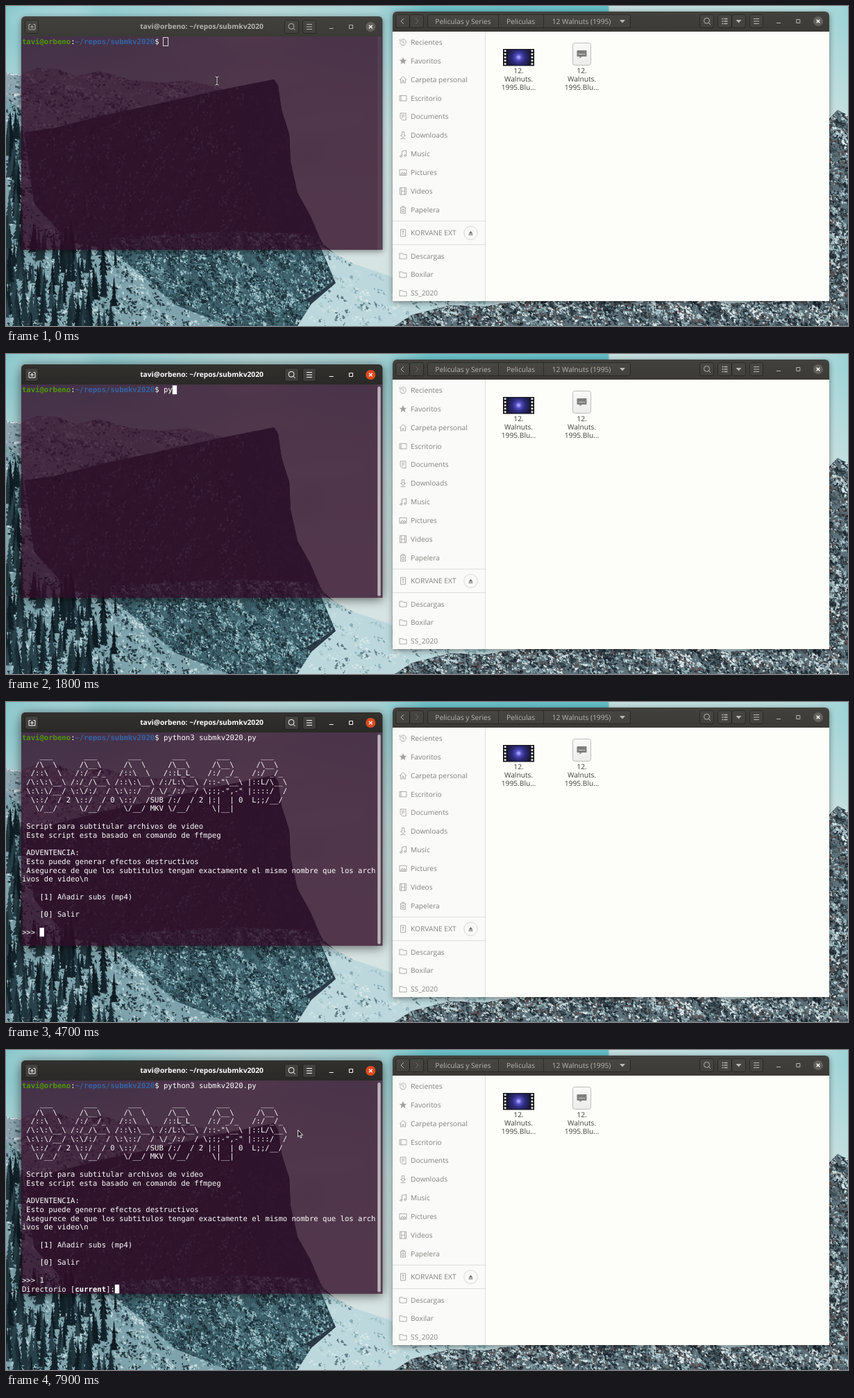
An HTML page with a canvas for the animation above (8000 ms loop, 1213 by 462 pixels).

```html
<!DOCTYPE html>
<html lang="es">
<head>
<meta charset="utf-8">
<title>submkv2020</title>
<style>
  html, body { margin: 0; width: 100%; height: 100%; overflow: hidden; background: #9cc5cc; }
  canvas { display: block; }
</style>
</head>
<body>
<canvas id="stage" width="1213" height="462"></canvas>
<script>
const W = 1213, H = 462, LOOP = 8000;
const UI = '"Open Sans", "Noto Sans", sans-serif';
const MONO = '"DejaVu Sans Mono", monospace';
const COL = 6.375, ROW = 12.75, LEFT = 23, TOP = 45.4;
const USER = 'tavi@orbeno', FOLDER = '~/repos/submkv2020', PROMPT_COLS = 32;

const screen = document.getElementById('stage').getContext('2d');
const backdrop = Object.assign(document.createElement('canvas'), { width: W, height: H });
let ctx = backdrop.getContext('2d');
for (const c of [screen, ctx]) c.textRendering = 'geometricPrecision';

// ---------- drawing helpers ----------
let seed = 2020;
function random(min = 0, max = 1) {
  seed = (seed + 0x6D2B79F5) | 0;
  let n = Math.imul(seed ^ (seed >>> 15), 1 | seed);
  n = (n + Math.imul(n ^ (n >>> 7), 61 | n)) ^ n;
  return min + (max - min) * ((n ^ (n >>> 14)) >>> 0) / 2 ** 32;
}
const pick = list => list[Math.floor(random(0, list.length))];

function shape(points) {
  const path = new Path2D();
  for (let i = 0; i < points.length; i += 2) path.lineTo(points[i], points[i + 1]);
  path.closePath();
  return path;
}
function fill(path, color) { ctx.fillStyle = color; ctx.fill(path); }
function rect(x, y, w, h, color) { ctx.fillStyle = color; ctx.fillRect(x, y, w, h); }
function rounded(x, y, w, h, r) {
  const path = new Path2D();
  path.roundRect(x, y, w, h, r);
  return path;
}
function gradient(x0, y0, x1, y1, ...stops) {
  const g = ctx.createLinearGradient(x0, y0, x1, y1);
  stops.forEach(([at, color]) => g.addColorStop(at, color));
  return g;
}
function disc(x, y, r, color) {
  ctx.beginPath();
  ctx.arc(x, y, r, 0, 7);
  ctx.fillStyle = color;
  ctx.fill();
}
function icon(x, y, d, color, { width = 1, solid = false } = {}) {
  ctx.save();
  ctx.translate(x, y);
  ctx.lineWidth = width;
  ctx.strokeStyle = ctx.fillStyle = color;
  ctx[solid ? 'fill' : 'stroke'](new Path2D(d));
  ctx.restore();
}
function label(text, x, y, color, { size = 10.2, weight = 400, align = 'left' } = {}) {
  ctx.font = `${weight} ${size}px ${UI}`;
  ctx.textAlign = align;
  ctx.fillStyle = color;
  ctx.fillText(text, x, y + 3.6);
}
function shadow(path, blur, alpha) {
  const outside = new Path2D();
  outside.rect(0, 0, W, H);
  outside.addPath(path);
  ctx.save();
  ctx.clip(outside, 'evenodd');
  ctx.shadowColor = `rgba(0,0,0,${alpha})`;
  ctx.shadowBlur = blur;
  ctx.shadowOffsetY = 2;
  fill(path, '#000');
  ctx.restore();
}

// ---------- wallpaper ----------
// Fills an outline and scatters clusters of angular flakes over it.
function mountain(points, color, clusters, flakes, slope, spread = 9) {
  const xs = points.filter((_, i) => i % 2 === 0), ys = points.filter((_, i) => i % 2);
  const [left, right, top, bottom] = [Math.min(...xs), Math.max(...xs), Math.min(...ys), Math.max(...ys)];
  const outline = shape(points);
  fill(outline, color);
  ctx.save();
  ctx.clip(outline);
  for (let i = 0; i < clusters; i++) {
    const cx = random(left, right), cy = random(top, bottom);
    const tint = pick(flakes);
    for (let j = 0; j < 6; j++) {
      const along = random(-spread, spread), across = random(-3, 3);
      const x = cx + Math.cos(slope) * along - Math.sin(slope) * across;
      const y = cy + Math.sin(slope) * along + Math.cos(slope) * across;
      const size = random(2, 6.5), angle = slope + random(-1, 1);
      const dx = Math.cos(angle) * size, dy = Math.sin(angle) * size, k = random(.2, .6);
      fill(shape([x, y, x + dx * k - dy * k, y + dy * k + dx * k, x + dx, y + dy, x + dx * .4, y + dy * .4 - 1]), tint);
    }
  }
  ctx.restore();
}
function tree(x, base, height) {
  const points = [x, base - height];
  for (const side of [1, -1]) {
    for (let i = 1; i <= 7; i++) {
      const k = side > 0 ? i / 7 : (8 - i) / 7;
      const reach = height * random(.09, .2) * k * side, y = base - height * (1 - k);
      if (side > 0) points.push(x + reach, y, x + reach * .5, y - 1);
      else points.push(x + reach * .5, y - 1, x + reach, y);
    }
  }
  fill(shape(points), pick(['#13222a', '#1a2b33', '#20343b', '#0f1b22', '#29414a']));
}
function forest(count, place) {
  const trees = Array.from({ length: count }, place).sort((a, b) => a[1] - b[1]);
  trees.forEach(([x, base]) => tree(x, base, random(24, 52)));
}
function wallpaper() {
  rect(0, 0, W, H, gradient(0, 0, W, 0, [0, '#86c6cb'], [.12, '#93cdd0'], [.3, '#b5d6d7'],
    [.44, '#a9d3d5'], [.5, '#6cc1c8'], [.715, '#62bec6'], [.717, '#c5dfdf'], [.96, '#b5dcdd'], [1, '#9dd3d6']));
  rect(0, 0, W, H, gradient(0, 20, 0, 330, [0, 'rgba(218,229,228,0)'], [.5, 'rgba(218,229,228,.7)'], [1, 'rgba(218,229,228,.92)']));
  ctx.filter = 'blur(10px)';
  ctx.globalAlpha = .22;
  for (let i = 0; i < 16; i++) {
    ctx.beginPath();
    ctx.ellipse(random(60, 540), random(0, 260), random(25, 70), random(5, 18), -.1, 0, 7);
    ctx.fillStyle = pick(['#fff', '#8fb5bb']);
    ctx.fill();
  }
  ctx.filter = 'none';
  ctx.globalAlpha = 1;

  mountain([0, 96, 22, 99, 45, 89, 75, 91, 100, 101, 135, 94, 180, 107, 225, 111, 262, 107, 310, 119, 380, 180, 380, 300, 0, 300],
    '#8ea6b0', 1300, ['#d3e1e5', '#a9bfc7', '#3f525e', '#62798a', '#7d949f'], .3, 14);
  mountain([0, 186, 70, 176, 140, 158, 215, 142, 300, 123, 355, 112, 386, 106, 392, 115, 397, 150, 408, 185, 410, 225,
    420, 270, 438, 302, 455, 342, 490, 372, 520, 390, 600, 462, 0, 462],
    '#2c3b48', 3200, ['#3a4d59', '#1a2530', '#222f3b', '#6a808b', '#2b3b47', '#4a5f6b'], 2.2, 12);
  // smoother cliff face turned away from the snow
  mountain([386, 106, 392, 115, 397, 150, 408, 185, 410, 225, 420, 270, 438, 302, 455, 342, 380, 320, 350, 250, 335, 180, 345, 115],
    '#2c3a4a', 300, ['#33424f', '#273441', '#3a4957'], 1.4, 14);
  // rock and snow at the foot of the cliff
  mountain([150, 335, 330, 325, 448, 330, 474, 368, 470, 400, 430, 425, 520, 462, 150, 462],
    '#3f626c', 2100, ['#22343d', '#2c4650', '#48707a', '#74a0a9', '#a3c6cc', '#1a2b34', '#3a5a65'], .9);
  mountain([452, 345, 500, 372, 560, 392, 640, 418, 720, 430, 1213, 424, 1213, 462, 420, 462, 440, 430, 475, 400],
    '#bcd8dc', 600, ['#d9e8ea', '#a1c4ca', '#5d7c86', '#87adb5', '#c9dfe2'], .6);
  mountain([0, 130, 22, 150, 40, 285, 90, 340, 150, 352, 200, 392, 240, 430, 320, 462, 0, 462],
    '#7fa3ac', 1300, ['#c6dce0', '#22353e', '#5b7f89', '#16262e', '#a9c9cf', '#31474f'], .7);
  mountain([560, 462, 585, 446, 640, 432, 690, 434, 745, 425, 840, 418, 920, 422, 985, 418, 1040, 430, 1100, 424, 1130, 410,
    1162, 310, 1184, 165, 1198, 150, 1213, 158, 1213, 462],
    '#5d717a', 7000, ['#dfe9ea', '#b9d0d4', '#5f5150', '#242e36', '#3c4b54', '#1d272f', '#93b0b7', '#2c363d'], .75);
  forest(120, () => [160 * random() ** 1.5, random(350, 490)]);
  forest(45, () => [random(0, 26), random(190, 400)]);
}

// ---------- shared window parts ----------
function headerButton(x, y, w, h = 20, lift = .03) {
  const box = rounded(x + .5, y + .5, w - 1, h - 1, 3);
  fill(box, `rgba(255,255,255,${lift})`);
  ctx.lineWidth = 1;
  ctx.strokeStyle = 'rgba(0,0,0,.38)';
  ctx.stroke(box);
}
const SEARCH = 'M3.5-.7A4 4 0 1 1-4.5-.7 4 4 0 1 1 3.5-.7M2.3 2.2 5 5';
const MENU = 'M-4-3.5H4M-4 0H4M-4 3.5H4';
const CROSS = 'M-2.3-2.3 2.3 2.3M2.3-2.3-2.3 2.3';
const ARROW_DOWN = 'M-4-2H4L0 2.5z';
function windowControls(x, y, color) {
  icon(x, y, 'M-3 2.5H3', color);
  icon(x + 28.3, y, 'M-2.5-2.5H2.5V2.5H-2.5z', color);
}

// ---------- file manager ----------
const PLACES = [
  ['Recientes', 'M1 5.5a4.5 4.5 0 1 0 1.8-3.6M1 .8v3h3M5.5 3v3l2 1'],
  ['Favoritos', 'M5.5 0 7 4h4L7.8 6.5 9 10.5 5.5 8 2 10.5 3.2 6.5 0 4h4z'],
  ['Carpeta personal', 'M.5 6 5.5 1l5 5M2 5v5.5h2.5V7h2v3.5H9V5'],
  ['Escritorio', 'M.5 2h10v7.5H.5zM2.5 2v7.5'],
  ['Documents', 'M1.5.5h8v10h-5l-3-3zM3.5 3h4M3.5 5h4M3.5 7h2'],
  ['Downloads', 'M4 .5h3v5h2L5.5 9 2 5.5h2zM2 10.5h7'],
  ['Music', 'M4 9V1.5l6-1V8M4 9a1.5 1.3 0 1 1-3 0 1.5 1.3 0 1 1 3 0M10 8a1.5 1.3 0 1 1-3 0 1.5 1.3 0 1 1 3 0'],
  ['Pictures', 'M.5 1.5h10v8H.5zM2 8l2.5-3 2 2L8 5.5 9.5 8z'],
  ['Videos', 'M1 .5h9v10H1zM3 .5v10M8 .5v10M3 5.5h5'],
  ['Papelera', 'M2 3v7.5h7V3M1 2.5h9M4 2V.5h3V2M4 5v3.5h3V5z'],
];
const FOLDER_ICON = 'M.5 1.5h4l1 1.5h5v6.5H.5z';
function place(name, y, d) {
  icon(566.5, y - 5.5, d, '#a09f9c', { width: .85, solid: name === 'Favoritos' });
  label(name, 583, y, '#82827e');
}
function fileName(x) {
  ['12.', 'Walnuts.', '1995.Blu…'].forEach((line, i) =>
    label(line, x, 93 + i * 12.1, '#3f3f3c', { align: 'center' }));
}
function fileManager() {
  const frame = rounded(557, 8, 629, 418, [6, 6, 0, 0]);
  shadow(frame, 9, .45);
  ctx.save();
  ctx.clip(frame);
  rect(557, 8, 629, 418, '#fdfdf9');
  rect(557, 8, 629, 29, gradient(0, 8, 0, 37, [0, '#42413d'], [1, '#3b3a36']));
  rect(557, 37, 133, 389, '#fafaf8');
  rect(690, 37, 1, 389, '#dededb');

  const tone = '#b9b8b3';
  headerButton(561, 12, 21);
  headerButton(581, 12, 21);
  icon(571, 22, 'M2-4-2 0 2 4', tone);
  icon(592, 22, 'M-2-4 2 0-2 4', '#6f6e6a');
  headerButton(607, 12, 293);
  for (const x of [709, 774]) rect(x, 13, 1, 18, '#2d2c29');
  label('Peliculas y Series', 658.5, 22, tone, { align: 'center' });
  label('Peliculas', 741.5, 22, tone, { align: 'center' });
  label('12 Walnuts (1995)', 829, 22, tone, { align: 'center' });
  icon(888, 22, ARROW_DOWN, tone, { solid: true });
  headerButton(999, 12, 21);
  icon(1010, 22, SEARCH, tone);
  headerButton(1025, 12, 21);
  icon(1035.5, 22, 'M-4-3.5H-2M-1-3.5H4M-4 0H-2M-1 0H4M-4 3.5H-2M-1 3.5H4', tone, { width: 1.4 });
  headerButton(1045, 12, 21);
  icon(1055.5, 22, ARROW_DOWN, tone, { solid: true });
  headerButton(1071, 12, 20);
  icon(1081, 22, MENU, tone);
  windowControls(1113, 22, tone);
  disc(1170, 22, 7, '#62615d');
  icon(1170, 22, CROSS, '#fff', { width: 1.4 });

  PLACES.forEach(([name, d], i) => place(name, 52.3 + i * 26.87, d));
  rect(557, 310, 133, 1, '#dededb');
  place('KORVANE EXT', 327.7, 'M2 .5h7v10H2zM5.5 2v6.5M4 4l1.5-1.5L7 4');
  ctx.beginPath();
  ctx.arc(669.5, 327.7, 9.7, 0, 7);
  ctx.lineWidth = 1;
  ctx.strokeStyle = '#d6d6d3';
  ctx.stroke();
  icon(669.5, 327.7, 'M-3 1 0-3 3 1zM-3 2H3V3.2H-3z', '#777773', { solid: true });
  rect(557, 344, 133, 1, '#dededb');
  ['Descargas', 'Boxilar', 'SS_2020'].forEach((name, i) => place(name, 361 + i * 26.87, FOLDER_ICON));

  // video thumbnail and subtitle file
  rect(716, 62, 45, 24.5, '#16151b');
  const glow = ctx.createRadialGradient(738.5, 74, 1, 738.5, 74, 18);
  [[0, '#a9a4f5'], [.2, '#514cc0'], [.5, '#2c2a78'], [1, '#1a183a']].forEach(s => glow.addColorStop(...s));
  rect(722.5, 63, 32, 22.5, glow);
  for (let i = 0; i < 5; i++) for (const x of [717.7, 756.5]) rect(x, 63.5 + i * 4.7, 2.8, 2.6, '#eee');
  fileName(738.5);
  const sheet = rounded(816.5, 53.5, 26, 32, 3);
  fill(sheet, gradient(0, 53, 0, 86, [0, '#fafaf9'], [1, '#ececea']));
  ctx.strokeStyle = '#bdbdba';
  ctx.stroke(sheet);
  icon(822.5, 64, 'M1 0h12q1 0 1 1v7q0 1-1 1H7L4 11.5V9H1Q0 9 0 8V1Q0 0 1 0z', '#7f7f7c', { solid: true });
  icon(822.5, 64, 'M2.5 5.5H8M9 5.5h2.5', '#d8d8d5');
  fileName(829.5);
  ctx.restore();
}

// ---------- terminal ----------
const OUTPUT = String.raw`
    ___       ___       ___       ___       ___       ___
   /\  \     /\__\     /\  \     /\__\     /\__\     /\__\
  /::\  \   /:/ _/_   /::\  \   /::L_L_   /:/ _/_   /:/ _/_
 /\:\:\__\ /:/_/\__\ /::\:\__\ /:/L:\__\ /::-"\__\ |::L/\__\
 \:\:\/__/ \:\/:/  / \:\::/  / \/_/:/  / \;:;-",-" |::::/  /
  \::/  / 2 \::/  / 0 \::/  /SUB /:/  / 2 |:|  | 0  L;;/__/
   \/__/     \/__/     \/__/ MKV \/__/     \|__|

 Script para subtitular archivos de video
 Este script esta basado en comando de ffmpeg

 ADVENTENCIA:
 Esto puede generar efectos destructivos
 Asegurece de que los subtitulos tengan exactamente el mismo nombre que los arch
ivos de video\n

    [1] Añadir subs (mp4)

    [0] Salir

>>> `.split('\n');
const MENU_ROW = 22;

const TYPED = [[0, ''], [1700, 'p'], [1800, 'py'], [2000, 'pyth'], [2300, 'pytho'], [2400, 'python'],
  [2800, 'python3'], [3000, 'python3 '], [4000, 'python3 su'], [4100, 'python3 submkv2020.py ']];
const CURSOR_OFF = [[1500, 1700], [3400, 3800], [5300, 5600], [7100, 7600]];
const POINTER = [[0, 'beam', 304, 108], [400, 'beam', 301, 113], [1400, 'hidden'], [7100, 'beam', 301, 113],
  [7300, 'beam', 403, 109], [7800, 'beam', 412, 114], [7900, 'arrow', 420, 115]];
const stateAt = (list, t) => list.findLast(([start]) => start <= t);

function mono(text, col, row, color = '#fff', weight = 400) {
  ctx.font = `${weight} 10.59px ${MONO}`;
  ctx.textAlign = 'left';
  ctx.fillStyle = color;
  ctx.fillText(text, LEFT + col * COL, TOP + row * ROW + 10);
}
function terminalText(t, focused) {
  const command = stateAt(TYPED, t)[1];
  mono(USER, 0, 0, '#4e9a06', 700);
  mono(':', USER.length, 0);
  mono(FOLDER, USER.length + 1, 0, '#3465a4', 700);
  mono('$ ' + command, PROMPT_COLS - 2, 0);
  let col = PROMPT_COLS + command.length, row = 0;
  if (t >= 4700) {
    OUTPUT.forEach((line, i) => mono(line, 0, i + 1));
    [col, row] = [4, MENU_ROW];
  }
  if (t >= 5700) mono('1', col++, row);
  if (t >= 6500) {
    mono('Directorio [', 0, ++row);
    mono('current', 12, row, '#fff', 700);
    mono(']:', 19, row);
    col = 21;
  }
  if (CURSOR_OFF.some(([from, to]) => t >= from && t < to)) return;
  const x = LEFT + col * COL, y = TOP + row * ROW;
  if (focused) rect(x, y, COL, ROW, '#fff');
  else {
    ctx.lineWidth = 1;
    ctx.strokeStyle = 'rgba(255,255,255,.8)';
    ctx.strokeRect(Math.round(x) - .5, Math.round(y) + .5, 7, 12);
  }
}
function terminal(t) {
  const p = Math.min(1, Math.max(0, (Math.floor(t / 100) * 100 - 700) / 300));
  const focus = 1 - (1 - p) ** 2;
  const frame = rounded(22, 15, 520.5, 337, [6, 6, 0, 0]);
  shadow(frame, 9 + 7 * focus, .45 + .15 * focus);
  ctx.save();
  ctx.clip(frame);
  rect(22, 44, 520.5, 308, 'rgba(48,10,36,.79)');
  rect(535, 44, 6, 308, 'rgba(255,255,255,.05)');
  rect(22, 15, 520.5, 29, gradient(0, 15, 0, 44, [0, '#42413d'], [1, '#3b3a36']));
  ctx.globalAlpha = focus;
  rect(22, 15, 520.5, 29, gradient(0, 15, 0, 44, [0, '#32312e'], [1, '#2a2927']));
  ctx.globalAlpha = 1;

  const level = 180 + 75 * focus, tone = `rgb(${level},${level},${level - 4 * (1 - focus)})`;
  const lift = .03 + .06 * focus;
  headerButton(27, 20, 20, 20, lift);
  icon(37.5, 30, 'M-2-3.5H-4.5V4H4.5V-3.5H2M0-2.5V2.5M-2.5 0H2.5', tone);
  headerButton(401, 20, 21, 20, lift);
  icon(411.5, 30, SEARCH, tone);
  headerButton(427, 20, 20, 20, lift);
  icon(437, 30, MENU, tone);
  label(`${USER}: ${FOLDER}`, 282, 29.7, tone, { size: 10.25, weight: 700, align: 'center' });
  windowControls(468.7, 30, tone);
  disc(525.3, 30, 7, '#62615d');
  ctx.globalAlpha = focus;
  disc(525.3, 30, 7, '#e0491d');
  ctx.globalAlpha = 1;
  icon(525.3, 30, CROSS, '#fff', { width: 1.4 });

  if (t >= 400) fill(rounded(535.3, 47, 4.4, 302.5, 2.2), '#bcb5b9');
  terminalText(t, t >= 800);
  ctx.restore();
}
function pointer([, kind, x, y]) {
  if (kind === 'beam') {
    const beam = 'M-2.5-6H-1L0-5 1-6H2.5M0-5V5M-2.5 6H-1L0 5 1 6H2.5';
    icon(x, y, beam, 'rgba(25,20,25,.85)', { width: 2.6 });
    icon(x, y, beam, '#e8e6e8');
  } else if (kind === 'arrow') {
    const arrow = 'M.5.5V10.5L2.8 8.4 4.5 12 6 11.3 4.4 7.8H7.6z';
    icon(x, y, arrow, '#1b1b1b', { solid: true });
    icon(x, y, arrow, '#f2f2f2', { width: .9 });
  }
}

wallpaper();
fileManager();
ctx = screen;

function draw(now) {
  const t = now % LOOP;
  ctx.drawImage(backdrop, 0, 0);
  terminal(t);
  pointer(stateAt(POINTER, t));
  requestAnimationFrame(draw);
}
draw(0);
</script>
</body>
</html>
```
